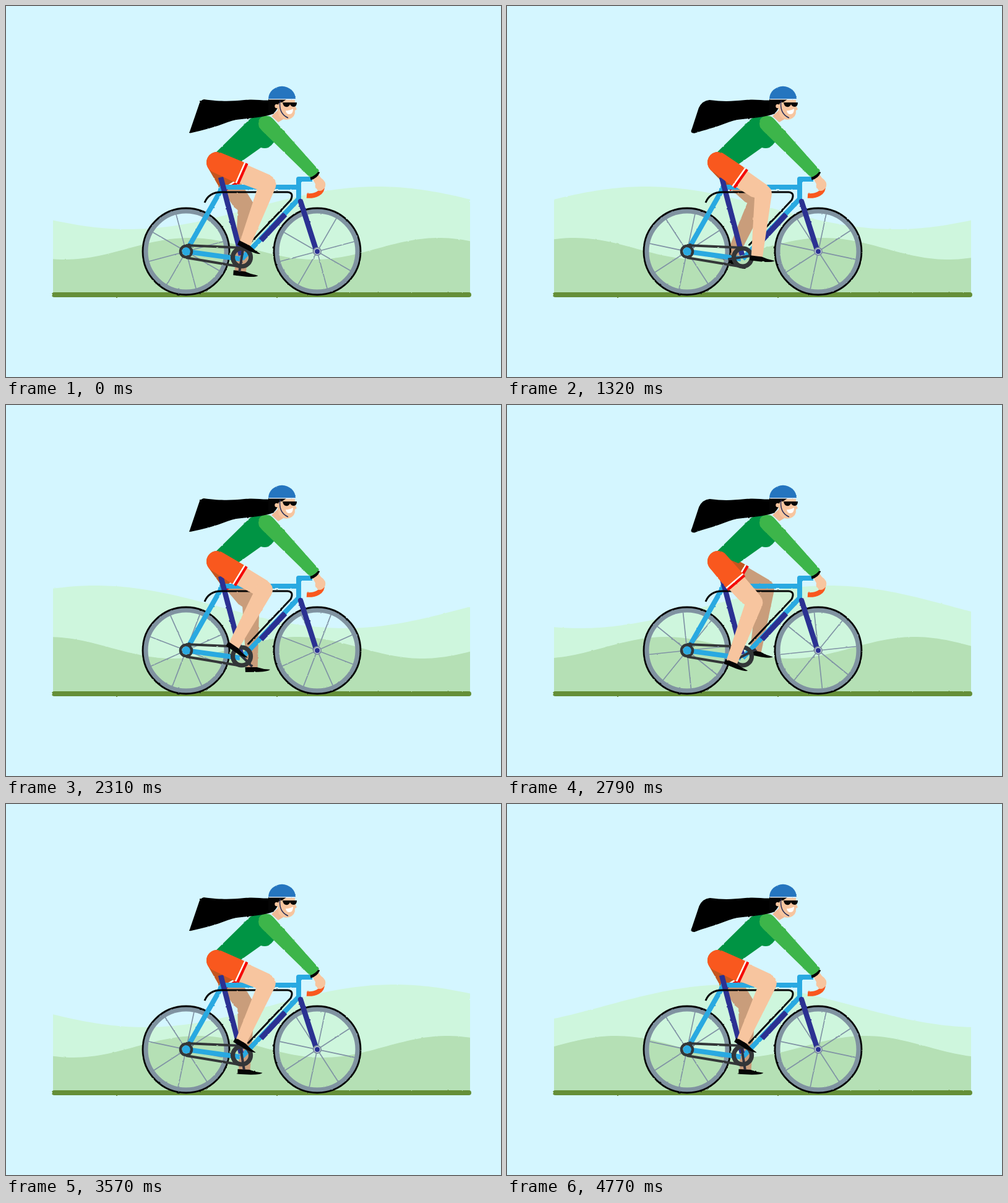
Recreate the animation shown at these times as an HTML page. Size 800x600 px, loop 4.8 s.

```html
<!DOCTYPE html>
<html lang="en">
<head>
<meta charset="utf-8">
<title>Cyclist</title>
<style>
  html, body { margin: 0; width: 100%; height: 100%; overflow: hidden; background: #d4f6ff; }
  svg { display: block; width: 800px; height: 600px; }
  .line { fill: none; stroke-linejoin: round; }
</style>
</head>
<body>
<svg id="stage" viewBox="0 0 800 600"></svg>
<script>
const FRAME_MS = 30, FRAMES = 160;
const HIP = { x: 341, y: 253 }, THIGH = 87, SHIN = 103;
const SKY_BLUE = '#29a9e1', NAVY = '#2b3192', DARK = '#333638';

const line = (d, color, width, cap = 'butt') =>
  `<path class="line" d="${d}" stroke="${color}" stroke-width="${width}" stroke-linecap="${cap}"/>`;
const shape = (d, color) => `<path d="${d}" fill="${color}"/>`;
const disc = (x, y, r, color) => `<circle cx="${x}" cy="${y}" r="${r}" fill="${color}"/>`;
const ring = (x, y, r, color, width) =>
  `<circle class="line" cx="${x}" cy="${y}" r="${r}" stroke="${color}" stroke-width="${width}"/>`;

function wheel(x, y) {
  let spokes = '';
  for (let a = 0; a < 180; a += 45) {
    spokes += `<path d="M0-62V62" stroke="#8093a5" stroke-width="1.7" transform="rotate(${a})"/>`;
  }
  return `<g transform="translate(${x} ${y})"><g class="spokes">${spokes}</g>` +
    ring(0, 0, 65.5, '#8093a1', 8) + ring(0, 0, 70, '#050505', 2.8) + '</g>';
}

function leg(id, skin, cloth) {
  return `<g id="${id}">
    <g class="thigh">${shape(`M20-16H${THIGH}V10L76 14L40 16H20Z`, skin)}</g>
    <g class="shin">${shape(`M0-16A16 16 0 0 0-11 11L0 11.5L${SHIN + 2} 9V-9L0-16Z`, skin)}</g>
    <g class="shoe">${shape('M-11-2L8-1Q18 3 29 4Q27 7 10 7L-11 6Z', '#050505')}</g>
    <g class="thigh">
      ${shape('M0-17L47-18V18L0 17A17 17 0 0 1 0-17Z', cloth)}
      ${line('M41.5-18V18', '#fff', 2.5)}${line('M45-18V18', '#f50a0a', 4)}
    </g></g>`;
}

const bike = [
  wheel(291, 397), wheel(503, 397),
  line('M350 293L291 397', SKY_BLUE, 8),
  line('M291 397L378 409', SKY_BLUE, 8),
  line('M349 293H473', SKY_BLUE, 8, 'round'),
  line('M495 280H473V312L381 409', SKY_BLUE, 8),
  line('M451 337L412 379', NAVY, 9),
  line('M347 277L380 403', NAVY, 8.5),
  line('M476 316L502 397', NAVY, 8.5, 'round'),
  line('M321 318Q328 301 348 301H455Q466 302 460 314L391 387', '#050505', 3),
  disc(503, 397, 7, '#8093a1'), disc(503, 397, 5, '#dbe5ee'), disc(503, 397, 4, NAVY),
  line('M291 387L381 391M291 407L381 422', DARK, 4),
  ring(291, 397, 9, DARK, 4.5), disc(291, 397, 6.5, SKY_BLUE),
  '<path id="crank" d="M0-24V24" stroke="#30313d" stroke-width="4"/>',
  ring(381, 406.5, 14.5, DARK, 7.2),
].join('');

const torso =
  shape('M336 240L394 183Q406 174 427 179L440 206Q435 222 424 229Q418 231 412 229L374 256Z', '#009444');

const arm = [
  line('M511 292C512 302 500 308 486 307', '#f9581e', 7.5),
  shape('M494 277L504 271L509 278Q518 284 516 292Q512 300 505 299Q498 295 500 288Z', '#f7c59f'),
  line('M492 279Q501 277 505 268', '#050505', 5),
  shape('M409 196Q405 181 417 178Q426 176 433 184L506 266Q500 275 491 277L414 202Z', '#3db54a'),
].join('');

const head = [
  shape('M429 178L440 168L450 182L440 188Z', '#f0b995'),
  shape('M436 152H467V161L470 167L467 169Q468 179 458 183Q449 186 441 178Z', '#f7c59f'),
  shape('M424 151H453L446 156Q441 155 440 160Q439 168 432 174L424 172Z', '#050505'),
  disc(437.5, 162, 3.2, '#f7c59f'),
  line('M443 153Q440 174 456 181', '#222b58', 1.4),
  shape('M447 156H470Q470 163 465 163Q461 163 459 159Q457 164 452 163Q448 162 447 156Z', '#050505'),
  shape('M452 169Q458 170 464 166Q464 175 458 175Q453 175 452 169Z', '#fff'),
].join('');

document.getElementById('stage').innerHTML = `
  <defs>
    <filter id="rough" filterUnits="userSpaceOnUse" x="0" y="0" width="800" height="600"
        color-interpolation-filters="sRGB">
      <feTurbulence type="fractalNoise" baseFrequency=".17" numOctaves="1" seed="4"/>
      <feDisplacementMap in="SourceGraphic" scale="2.2" xChannelSelector="R" yChannelSelector="G"/>
    </filter>
  </defs>
  <rect width="800" height="600" fill="#d4f6ff"/>
  <g filter="url(#rough)">
    <path id="farHill" fill="#cef6dd"/>
    <path id="nearHill" fill="#b5e0b5"/>
    ${line('M78 467H748', '#658f38', 8, 'round')}
    ${leg('backLeg', '#c99d7b', '#c4551f')}
    ${bike}
    ${torso}
    ${leg('frontLeg', '#f7c59f', '#f9581e')}
    ${arm}
    <path id="hair" fill="#000"/>
  </g>
  ${head}
  <g filter="url(#rough)">${shape('M424 150.5A22 20.7 0 0 1 468 150.5Z', '#2575bf')}</g>
  ${line('M425 150.7H468', '#d7e5f1', 1.6)}`;

const byId = id => document.getElementById(id);
const rad = deg => deg * Math.PI / 180;
const place = (parent, selector, x, y, deg) =>
  parent.querySelectorAll(selector).forEach(el =>
    el.setAttribute('transform', `translate(${x} ${y}) rotate(${deg})`));

// phase is in degrees at the middle of the scene
function drawHill(id, mid, height, length, phase) {
  let d = 'M76 467';
  for (let i = 0; i <= 100; i++) {
    const x = 76 + i * 6.74;
    const y = mid - height * Math.cos(rad(phase + (x - 413) * 360 / length));
    d += `L${x.toFixed(1)} ${y.toFixed(2)}`;
  }
  byId(id).setAttribute('d', d + 'V467Z');
}

// Two-bone leg: the pedal moves the foot, the knee bends forward
function poseLeg(id, turn) {
  const el = byId(id);
  const tilt = 14 + 17 * Math.cos(rad(turn + 45));
  const ankle = {
    x: 392 + 22 * Math.sin(rad(turn)) - 10 * Math.cos(rad(tilt)),
    y: 410 - 21 * Math.cos(rad(turn)) - 10 * Math.sin(rad(tilt)),
  };
  const dx = ankle.x - HIP.x, dy = ankle.y - HIP.y, reach = Math.hypot(dx, dy);
  const bend = (THIGH ** 2 + reach ** 2 - SHIN ** 2) / (2 * THIGH * reach);
  const hipAngle = Math.atan2(dy, dx) - Math.acos(Math.min(1, bend));
  const knee = { x: HIP.x + THIGH * Math.cos(hipAngle), y: HIP.y + THIGH * Math.sin(hipAngle) };
  const shinAngle = Math.atan2(ankle.y - knee.y, ankle.x - knee.x);
  place(el, '.thigh', HIP.x, HIP.y, hipAngle * 180 / Math.PI);
  place(el, '.shin', knee.x, knee.y, shinAngle * 180 / Math.PI);
  place(el, '.shoe', ankle.x, ankle.y, tilt);
}

// The loose end swings between a sharp and a rounded tip
function drawHair(step) {
  const wave = Math.sin(rad(step * 12));
  const round = Math.max(0, Math.min(1, wave * 4.8));
  const cx = 315 + wave, cy = 152 + round;
  const tx = 296, ty = 205.5 + 1.5 * wave;
  const soft = 5 + 7 * round, tip = 2 + 5 * round;
  byId('hair').setAttribute('d', `M433 152C415 154 405 150 385 152S350 155 ${cx + soft} ${cy - 1}
    Q${cx} ${cy} ${cx - soft * .45} ${cy + soft}L${tx + tip * .4} ${ty - tip}
    Q${tx - 1} ${ty} ${tx + tip} ${ty}C318 201 338 196 358 188S405 184 433 174Z`);
}

function draw() {
  const step = Math.floor(performance.now() / FRAME_MS) % FRAMES;
  const turn = 9 + 18 * step;
  drawHill('farHill', 326.5, 34.5, 805, 276 + 12 * step);
  drawHill('nearHill', 392.5, 17.5, 403, 104 + 12 * step);
  document.querySelectorAll('.spokes').forEach(el =>
    el.setAttribute('transform', `rotate(${30 + 18 * step})`));
  byId('crank').setAttribute('transform', `translate(381 406) rotate(${turn})`);
  poseLeg('backLeg', turn + 180);
  poseLeg('frontLeg', turn);
  drawHair(step);
  requestAnimationFrame(draw);
}
draw();
</script>
</body>
</html>
```
